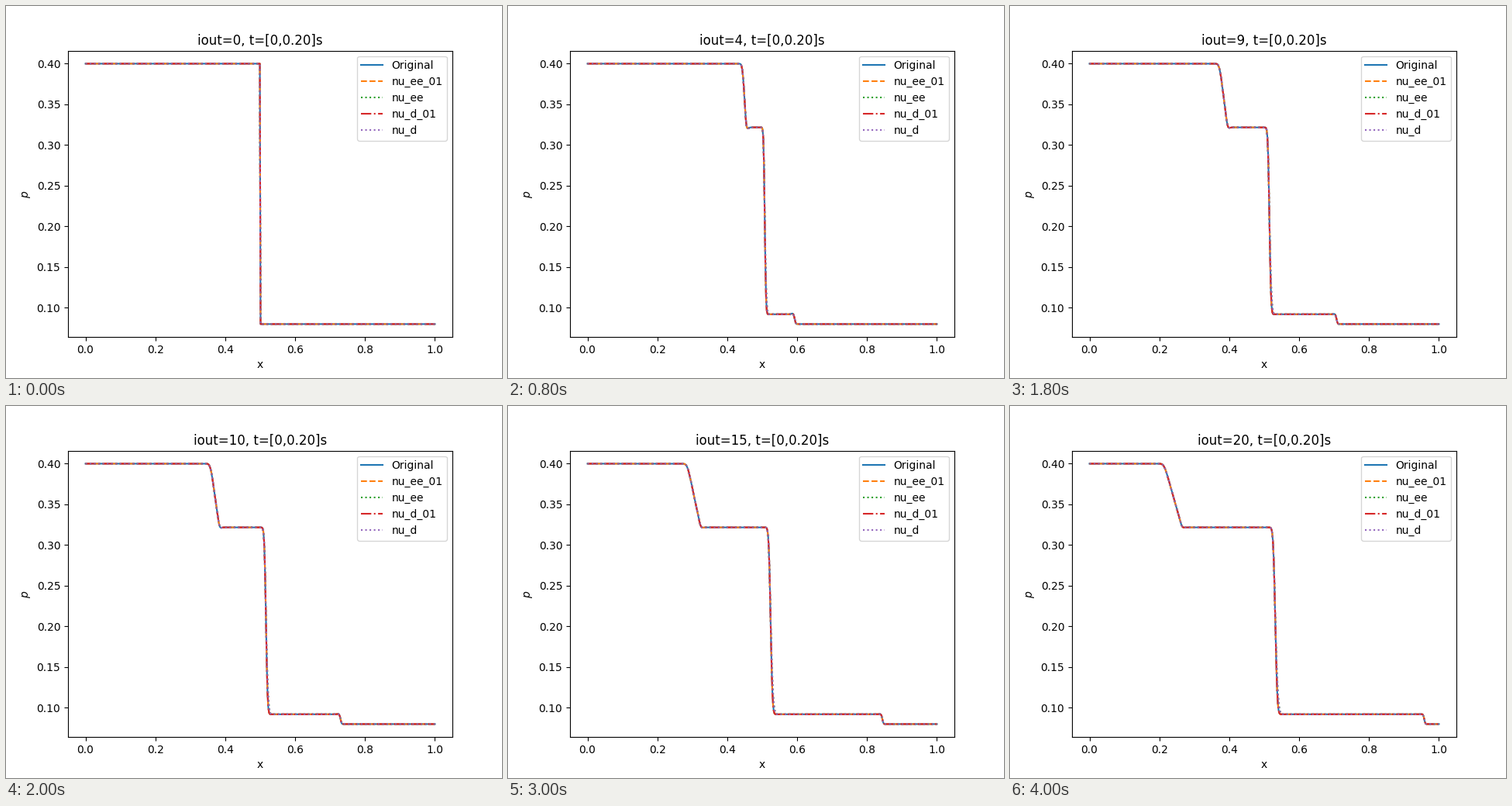
Recreate the animation shown at these times as a matplotlib script. Size 640 by 480 pixels, loop 4200 ms.

```python
import numpy as np
import matplotlib.pyplot as plt
from matplotlib.animation import FuncAnimation

FRAMES = 21
INTERVAL = 200
LEFT, UPPER, LOWER, RIGHT = 0.4, 0.3217, 0.092, 0.08
STYLES = [
    ("Original", "-", 1.0),
    ("nu_ee_01", "--", 1.0),
    ("nu_ee", ":", 1.35),
    ("nu_d_01", "-.", 1.0),
    ("nu_d", ":", 1.35),
]

x = np.linspace(0, 1, 500)


def smooth_step(z):
    """Close approximation of the normal distribution function."""
    z = np.clip(z, -8, 8)
    return 0.5 * (1 + np.tanh(0.7979 * (z + 0.04472 * z**3)))


def bump(z):
    return np.exp(-0.5 * z**2)


def smooth_ramp(d, width):
    z = d / width
    return d * smooth_step(z) + width * bump(z) / np.sqrt(2 * np.pi)


def profile(t, foot):
    """Rarefaction, contact and shock at time t; foot widens the contact's end."""
    if t == 0:
        return np.where(x < 0.5, LEFT, RIGHT)
    spread = (t / 0.2) ** (1 / 3)
    head, tail = 0.5015 - 1.44 * t, 0.5015 - 1.185 * t
    contact, shock = 0.5013 + 0.152 * t, 0.5018 + 2.281 * t
    ripple = min(1.0, 0.04 / t)

    fan = (smooth_ramp(x - head, 0.006 * spread)
           - smooth_ramp(x - tail, 0.003 * spread)) / (tail - head)
    p = LEFT - (LEFT - UPPER) * fan
    p -= 0.0013 * ripple * bump((x - tail - 0.005) / 0.003)

    d = x - contact
    width = 0.0047 * spread * np.where(d > 0, foot, 1.0)
    p -= (UPPER - LOWER) * smooth_step(d / width)

    p -= (LOWER - RIGHT) * smooth_step((x - shock) / 0.0024)
    p += 0.001 * ripple * bump((x - shock + 0.007) / 0.003)
    return p


fig, ax = plt.subplots(figsize=(6.4, 4.8), dpi=100)
lines = [ax.plot(x, profile(0, foot), style, label=label)[0]
         for label, style, foot in STYLES]
ax.set_xlim(-0.05, 1.05)
ax.set_ylim(0.064, 0.416)
ax.set_xlabel("x")
ax.set_ylabel("$p$")
ax.legend(loc="upper right")
title = ax.set_title("")


def update(n):
    title.set_text(f"iout={n}, t=[0,0.20]s")
    for line, (_, _, foot) in zip(lines, STYLES):
        line.set_ydata(profile(n * 0.01, foot))
    return [title, *lines]


anim = FuncAnimation(fig, update, frames=FRAMES, interval=INTERVAL,
                     repeat=True, repeat_delay=0)
plt.show()
```
